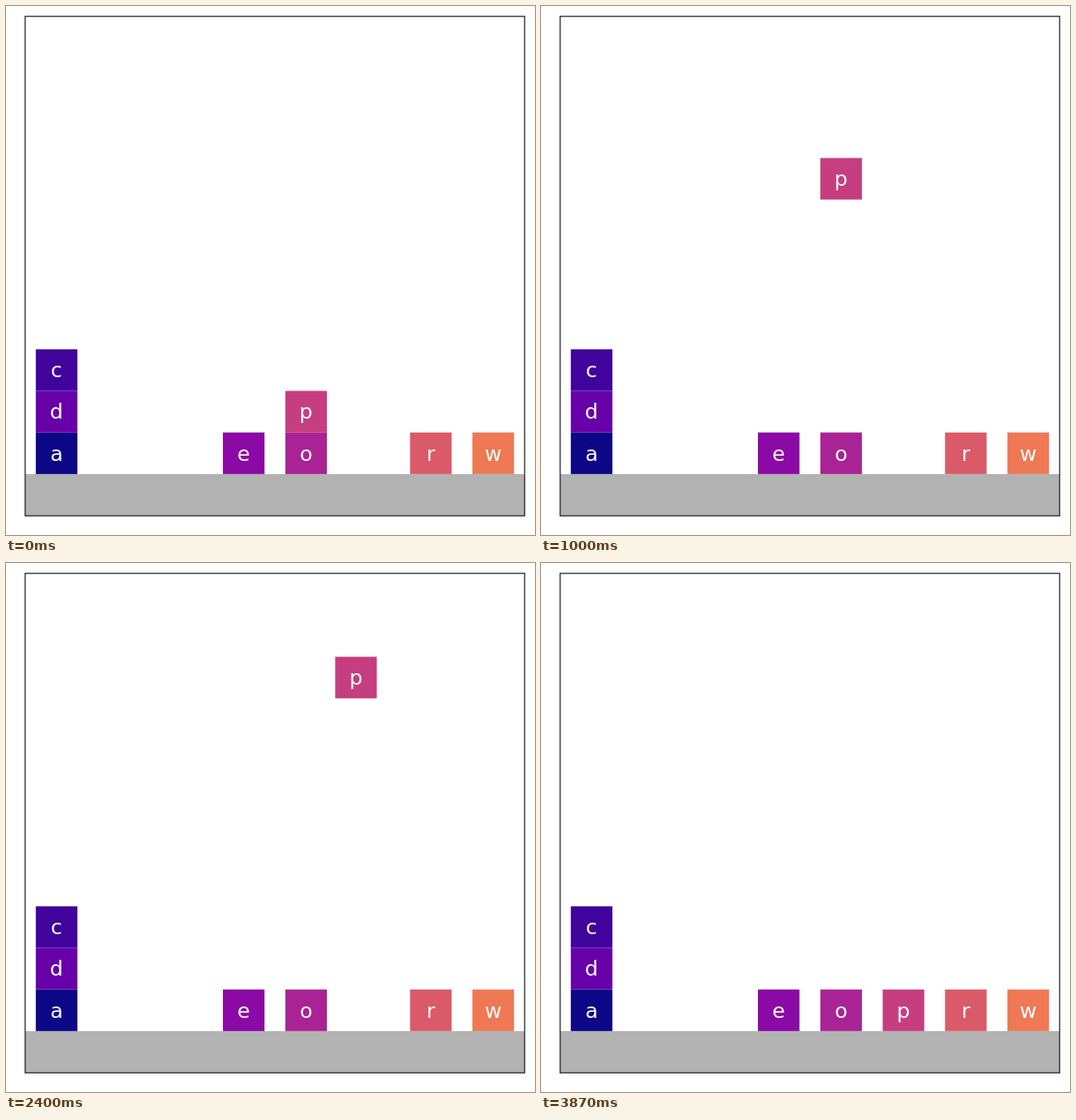
These frames come from a looping animation (600 px wide and 600 px high, 4.87 s). An HTML page:

```html
<!DOCTYPE html>
<html lang="en">
<head>
<meta charset="utf-8">
<title>Blocks</title>
<style>
  html, body { margin: 0; width: 100%; height: 100%; overflow: hidden; background: #fff; }
  svg { display: block; width: 100%; height: 100%; }
  text { font: 23.6px "DejaVu Sans", sans-serif; fill: #fff; text-anchor: middle; }
</style>
</head>
<body>
<svg id="stage" viewBox="0 0 600 600">
  <rect x="22" y="530.9" width="566" height="47.2" fill="#b2b2b2"/>
  <g id="blocks"></g>
  <rect x="21.75" y="11.75" width="566.5" height="566.5" fill="none" stroke="#222" stroke-width="1.2"/>
</svg>
<script>
const NS = "http://www.w3.org/2000/svg";
const LOOP = 4870, TICK = 200 / 3;
const UNIT = 566 / 12, PITCH = UNIT * 1.5;
const LIFT = 8, LEVEL = UNIT;

// letter, colour, column, height in the stack
const BLOCKS = [
  ["a", "#0c0786", 0, 0],
  ["d", "#6700a8", 0, 1],
  ["c", "#40039c", 0, 2],
  ["e", "#8b09a5", 3, 0],
  ["o", "#a92395", 4, 0],
  ["r", "#da5a69", 6, 0],
  ["w", "#ee7954", 7, 0],
  ["p", "#c53e7f", 4, 1]
];

function add(parent, tag, attrs) {
  const el = document.createElementNS(NS, tag);
  for (const k in attrs) el.setAttribute(k, attrs[k]);
  return parent.appendChild(el);
}

function place(el, col, level) {
  const x = 22 + UNIT / 4 + col * PITCH;
  const y = 530.87 - (level + 1) * LEVEL;
  el.setAttribute("transform", `translate(${x.toFixed(3)} ${y.toFixed(3)})`);
}

function makeBlock([letter, fill, col, level]) {
  const g = add(document.getElementById("blocks"), "g", {});
  add(g, "rect", { width: UNIT, height: UNIT, fill });
  add(g, "text", { x: UNIT / 2, y: UNIT / 2 + 8.3 }).textContent = letter;
  place(g, col, level);
  return g;
}

const mover = BLOCKS.map(makeBlock).pop();

// progress of a move in whole steps; the first visible step skips one
function progress(tick, start, steps) {
  const n = tick - start;
  return n < 1 ? 0 : Math.min(n + 1, steps) / steps;
}

function draw(now) {
  const t = now % LOOP;
  // changes fall on hundredths of a second
  const tick = Math.floor((t + 5) / TICK);
  const up = progress(tick, 0, 20);
  const across = progress(tick, 29, 10);
  const down = Math.max(0, Math.min(1, (tick - 38) / 20));
  place(mover, 4 + across, 1 + (LIFT - 1) * up - LIFT * down);
}

const start = performance.now();
function frame(now) {
  draw(Math.max(0, now - start));
  requestAnimationFrame(frame);
}
draw(0);
requestAnimationFrame(frame);
</script>
</body>
</html>
```
